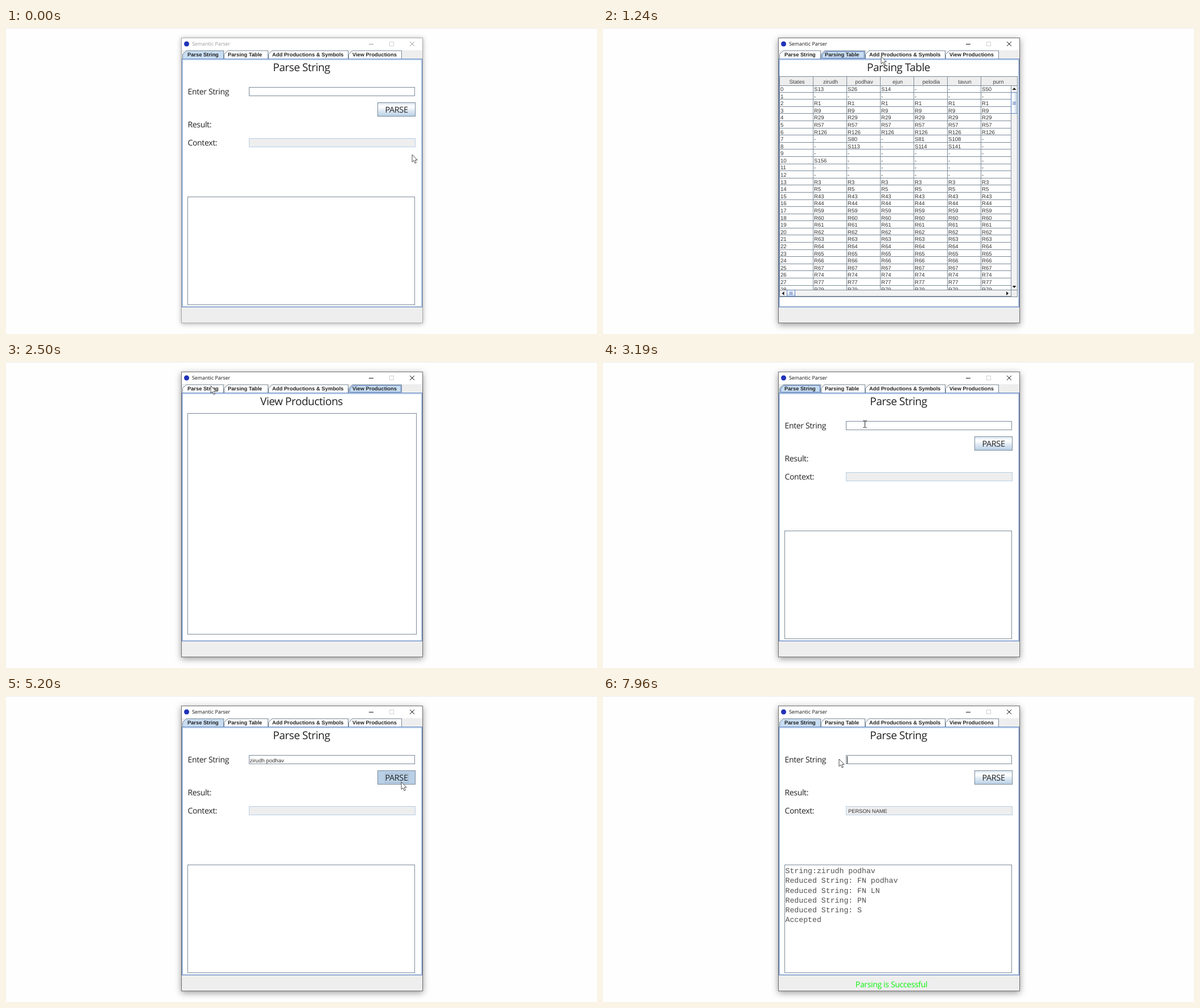
Write an HTML page that moves like this. It is 1039 px wide and 539 px high and loops after 8000 ms.

```html
<!DOCTYPE html>
<html lang="en">
<head>
<meta charset="utf-8">
<title>Semantic Parser</title>
<style>
html, body { margin: 0; width: 100%; height: 100%; overflow: hidden; background: #fefefe; }
svg { display: block; }
text { white-space: pre; fill: #333; font: 9.6px "Liberation Sans", Arial, sans-serif; text-rendering: geometricPrecision; }
rect, .crisp { shape-rendering: crispEdges; }
.ui { font: 14px "Open Sans", "Noto Sans", sans-serif; letter-spacing: -.025em; fill: #222; }
.title { font-size: 19px; text-anchor: middle; }
.press { font-size: 14.4px; text-anchor: middle; }
.tab { font-size: 9.3px; font-weight: bold; fill: #222; }
.caption { font: 8.9px "Open Sans", "Noto Sans", sans-serif; fill: #111; }
.head { text-anchor: middle; fill: #444; }
.small { font-size: 9.3px; }
.mono { font: 13.2px "Liberation Mono", "Courier New", monospace; fill: #505050; }
.ok { fill: #0df20d; text-anchor: middle; }
.line { fill: none; stroke: #7a8a99; }
#frame { fill: #fff; stroke: #707070; filter: drop-shadow(0 3px 6px rgba(0, 0, 0, .4)); }
#controls { fill: none; stroke: #111; }
.idle #frame { stroke: #aaa; filter: drop-shadow(0 1px 4px rgba(0, 0, 0, .3)); }
.idle #controls { stroke: #999; }
.idle .caption { fill: #999; }
</style>
</head>
<body>
<svg id="stage" width="1039" height="539" viewBox="0 0 1039 539">
  <defs>
    <linearGradient id="steel" x2="0" y2="1">
      <stop stop-color="#dde8f3"/><stop offset=".3" stop-color="#fff"/>
      <stop offset=".6" stop-color="#dde8f3"/><stop offset="1" stop-color="#b8cfe5"/>
    </linearGradient>
    <linearGradient id="thumb">
      <stop stop-color="#dde8f3"/><stop offset=".35" stop-color="#fff"/><stop offset="1" stop-color="#b8cfe5"/>
    </linearGradient>
    <clipPath id="cells"><rect x="310" y="101" width="407" height="360"/></clipPath>
  </defs>
</svg>
<script>
const LOOP = 8000;
const FIRST = 'zirudh', LAST = 'podhav', NAME = FIRST + ' ' + LAST;
const EDGE = '#7a8a99', BLUE = '#6382bf', PALE = '#c8ddf2', MID = '#b8cfe5';
const stage = document.getElementById('stage');
const $ = id => document.getElementById(id);

const text = (x, y, s, cls = '', more = '') =>
  `<text x="${x}" y="${y}" class="${cls}" ${more}>${s.replace('&', '&amp;')}</text>`;
const box = (x, y, x2, y2, fill = '#fff', stroke = EDGE, more = '') =>
  `<rect x="${x + .5}" y="${y + .5}" width="${x2 - x - 1}" height="${y2 - y - 1}" fill="${fill}" stroke="${stroke}" ${more}/>`;
const fill = (x, y, x2, y2, color, more = '') =>
  `<rect x="${x}" y="${y}" width="${x2 - x}" height="${y2 - y}" fill="${color}" ${more}/>`;
const path = (d, more = 'class="line crisp"') => `<path d="${d}" ${more}/>`;
const label = (y, s) => text(319.5, y, s, 'ui');
const title = (s, y = 76, more = '') => text(519.5, y, s, 'ui title', more);
const button = (x, y, s, id = '') =>
  box(x, y, 720, y + 25, 'url(#steel)', EDGE, id) + text((x + 720) / 2, y + 18, s, 'ui press');
const group = (id, body) => `<g id="${id}">${body}</g>`;

// Window frame and tabs
const TABS = [
  [310, 383, 319, 'Parse String'], [383, 461, 390, 'Parsing Table'],
  [461, 602, 468, 'Add Productions & Symbols'], [602, 696, 609, 'View Productions']];

function chrome() {
  const tabs = TABS.map(([x, x2, tx, s], i) =>
    path(`M${x + .5} 54.5V46.5L${x + 7} 40H${x2 - .5}V54.5`, `id="tab${i}" stroke="${EDGE}"`) +
    path(`M${x + 2.5} 53V47L${x + 8} 41.5H${x2 - 2}V53Z`, `id="ring${i}" fill="none" stroke="${BLUE}"`) +
    text(tx, 50, s, 'tab')).join('');
  return fill(0, 0, 1039, 1, '#ebebeb') +
    '<rect id="frame" x="308.5" y="17.5" width="424" height="502"/>' +
    '<circle cx="317.5" cy="28" r="4.5" fill="#2133b8"/>' +
    text(327, 31, 'Semantic Parser', 'caption') +
    group('controls', path('M638 28.5H646', 'class="crisp"') + path('M710 24L718 32M718 24L710 32', '')) +
    box(674, 24, 682, 32, 'none', '#d0d0d0') +
    fill(309, 39, 732, 519, '#eee') + tabs +
    box(309, 54, 732, 492, PALE, BLUE) + fill(311, 57, 730, 490, '#fff');
}

function parsePage() {
  const log = ['String:' + NAME, 'Reduced String: FN ' + LAST, 'Reduced String: FN LN',
    'Reduced String: PN', 'Reduced String: S', 'Accepted'];
  return title('Parse String') + label(116.5, 'Enter String') + label(174.5, 'Result:') + label(206.5, 'Context:') +
    box(427, 104, 719, 120) + fill(429, 106, 492, 119, MID, 'id="picked"') +
    text(428.5, 116.5, '', '', 'id="typed"') + fill(429, 106, 430, 119, '#222', 'id="caret"') +
    button(653, 131, 'PARSE', 'id="parse"') + box(654, 132, 719, 155, 'none', MID, 'id="hover"') +
    box(666, 136, 708, 153, 'none', '#a3b8cc', 'id="focus"') +
    box(427, 194, 720, 210, '#eee', MID) + box(319, 297, 719, 488) +
    group('result', text(431, 206, 'PERSON NAME', 'small') +
      log.map((s, i) => text(320.5, 312 + i * 17.25, s, 'mono')).join('') +
      text(507, 513, 'Parsing is Successful', 'ui ok'));
}

// Numbered reductions; other rows are listed or blank
function cell(row, col) {
  const shifts = { 0: 'S13 S26 S14 - - S50', 7: '- S80 - S81 S108 -', 8: '- S113 - S114 S141 -', 10: 'S156 - - - - -' };
  const rules = { 2: 1, 3: 9, 4: 29, 5: 57, 6: 126, 13: 3, 14: 5, 15: 43, 16: 44, 24: 66, 25: 67, 26: 74, 27: 77, 28: 79 };
  if (shifts[row]) return shifts[row].split(' ')[col];
  if (row > 16 && row < 24) return 'R' + (row + 42);
  return rules[row] ? 'R' + rules[row] : '-';
}

function tablePage() {
  const heads = ['States', FIRST, LAST, 'ejun', 'pelodia', 'tavun', 'purn'];
  const pitch = 12.59;
  let cells = '', rules = 'M310 101.5H729', top = '';
  heads.forEach((s, c) => {
    top += text(341 + c * 59, 98, s, 'head');
    if (c) rules += `M${310.5 + c * 59} 86V461`;
  });
  for (let r = 0; r < 29; r++) {
    const y = 101 + r * pitch;
    rules += `M310 ${Math.floor(y + pitch - .4) + .5}H717`;
    cells += text(312, y + 10, String(r));
    for (let c = 0; c < 6; c++) cells += text(371 + c * 59, y + 10, cell(r, c));
  }
  const black = 'fill="#222"';
  return title('Parsing Table') + fill(310, 86, 729, 101, '#eee') + top +
    path(rules) + `<g clip-path="url(#cells)">${cells}</g>` +
    box(717, 101, 729, 462, '#f2f2f2') + box(310, 461, 718, 473, '#f2f2f2') + fill(718, 462, 729, 473, '#eee') +
    box(717, 113, 729, 151, 'url(#thumb)', BLUE) + box(323, 461, 338, 473, 'url(#steel)', BLUE) +
    path('M720 130.5H726M720 132.5H726M720 134.5H726M328.5 464V470M330.5 464V470M332.5 464V470',
      `class="crisp" stroke="${BLUE}"`) +
    path('M719.5 109L723 105 726.5 109ZM719.5 454L723 458 726.5 454ZM318.5 464L314.5 467.5 318.5 471ZM709 464L713 467.5 709 471Z', black) +
    box(310, 85, 729, 474, 'none');
}

const addPage = () =>
  title('Add Productions & Symbols', 77, 'style="font-size:18.6px"') +
  label(125, 'Enter Production:') + box(468, 113, 721, 128) +
  label(172, 'Context:') + box(468, 158, 721, 173) + button(666, 199, 'ADD') +
  label(276, 'Terminals:') + box(454, 263, 719, 278) +
  label(336, 'Non-Terminals:') + box(454, 322, 719, 337) + button(666, 370, 'ADD');

const viewPage = () => title('View Productions') + box(319, 90, 722, 480);

stage.insertAdjacentHTML('beforeend', chrome() +
  [parsePage, tablePage, addPage, viewPage].map((make, i) => group('page' + i, make())).join('') +
  '<circle id="click" r="9.5" fill="#f6ec1e" fill-opacity=".78"/>' +
  path('M0 0V13L3 10.3 5.1 15.3 7.3 14.3 5.2 9.5H9.2Z', 'id="arrow" fill="#fff" stroke="#222" stroke-width=".8"') +
  path('M-3-6H-.8L0-5.3 .8-6H3M0-5.3V5.3M-3 6H-.8L0 5.3 .8 6H3', 'id="beam" fill="none" stroke="#222"'));

// Pointer moves: start, end, steps, x, y
const MOVES = [
  [80, 480, 6, 426, 50], [940, 1240, 5, 489, 50], [1560, 1730, 3, 622, 41], [2180, 2500, 5, 360, 42],
  [3190, 3190, 1, 460.5, 109.5], [4600, 4810, 4, 695, 151.5], [5610, 6380, 11, 520, 129],
  [6460, 6460, 1, 515.5, 128], [6770, 6860, 2, 498.5, 113.5], [7400, 7570, 3, 415, 111]];
// Click halos: start, end, x, y
const CLICKS = [
  [560, 640, 426, 50], [1390, 1560, 489, 49.5], [1950, 2100, 622, 41.5], [2730, 2890, 360.5, 41.5],
  [3350, 3490, 458.5, 109], [5050, 5200, 694.5, 151.5], [7240, 7400, 496.5, 113]];

const within = (t, a, b) => t >= a && t < b;
const show = (id, on) => { $(id).style.display = on ? '' : 'none'; };
const ease = p => p * p * (3 - 2 * p);

function pointer(t) {
  let x = 714, y = 223;
  for (const [a, b, n, tx, ty] of MOVES) {
    if (t < a) break;
    const step = n > 1 ? Math.floor((t - a) / (b - a) * (n - 1) + 1e-6) + 1 : 1;
    const p = ease(Math.min(1, step / n));
    x += (tx - x) * p;
    y += (ty - y) * p;
  }
  return [x, y];
}

function typedCount(t) {
  if (t < 3490 || t >= 7960) return 0;
  if (t < 3590) return 1;
  if (t < 3930) return 2;
  return Math.round(2 + 11 * Math.min(5, Math.floor((t - 3930) / 90) + 1) / 5);
}

function draw(t) {
  const page = t < 560 ? 0 : t < 1470 ? 1 : t < 2020 ? 2 : t < 2730 ? 3 : 0;
  stage.classList.toggle('idle', t < 560);
  TABS.forEach((_, i) => {
    show('page' + i, i === page);
    show('ring' + i, i === page && within(t, 560, 3350));
    $('tab' + i).setAttribute('fill', i === page ? PALE : '#fff');
  });

  const [x, y] = pointer(t);
  const beam = within(t, 3190, 4600) || within(t, 6770, 7570);
  show('beam', beam);
  show('arrow', !beam);
  $(beam ? 'beam' : 'arrow').setAttribute('transform', `translate(${x} ${y})`);

  const hit = CLICKS.find(([a, b]) => within(t, a, b));
  show('click', hit);
  if (hit) $('click').setAttribute('transform', `translate(${hit[2]} ${hit[3]})`);

  const typed = $('typed'), count = typedCount(t);
  typed.textContent = NAME.slice(0, count);
  const end = 429 + (count && page === 0 ? typed.getComputedTextLength() : 0);
  const picking = within(t, 7400, 7960);
  const from = picking ? Math.min(end, Math.max(429, x)) : end;
  show('picked', picking);
  $('picked').setAttribute('x', from);
  $('picked').setAttribute('width', Math.max(0, end - from));
  show('caret', within(t, 3490, 3760) || within(t, 3930, 5050) || t >= 7240);
  $('caret').setAttribute('x', Math.round(from));

  const pressed = within(t, 5050, 5360);
  $('parse').setAttribute('fill', pressed ? MID : 'url(#steel)');
  show('hover', !pressed && within(x, 653, 720) && within(y, 131, 156));
  show('focus', within(t, 5050, 7240));
  show('result', t >= 5360);
}

const start = performance.now();
function tick() {
  draw((performance.now() - start) % LOOP);
  requestAnimationFrame(tick);
}
tick();
</script>
</body>
</html>
```
